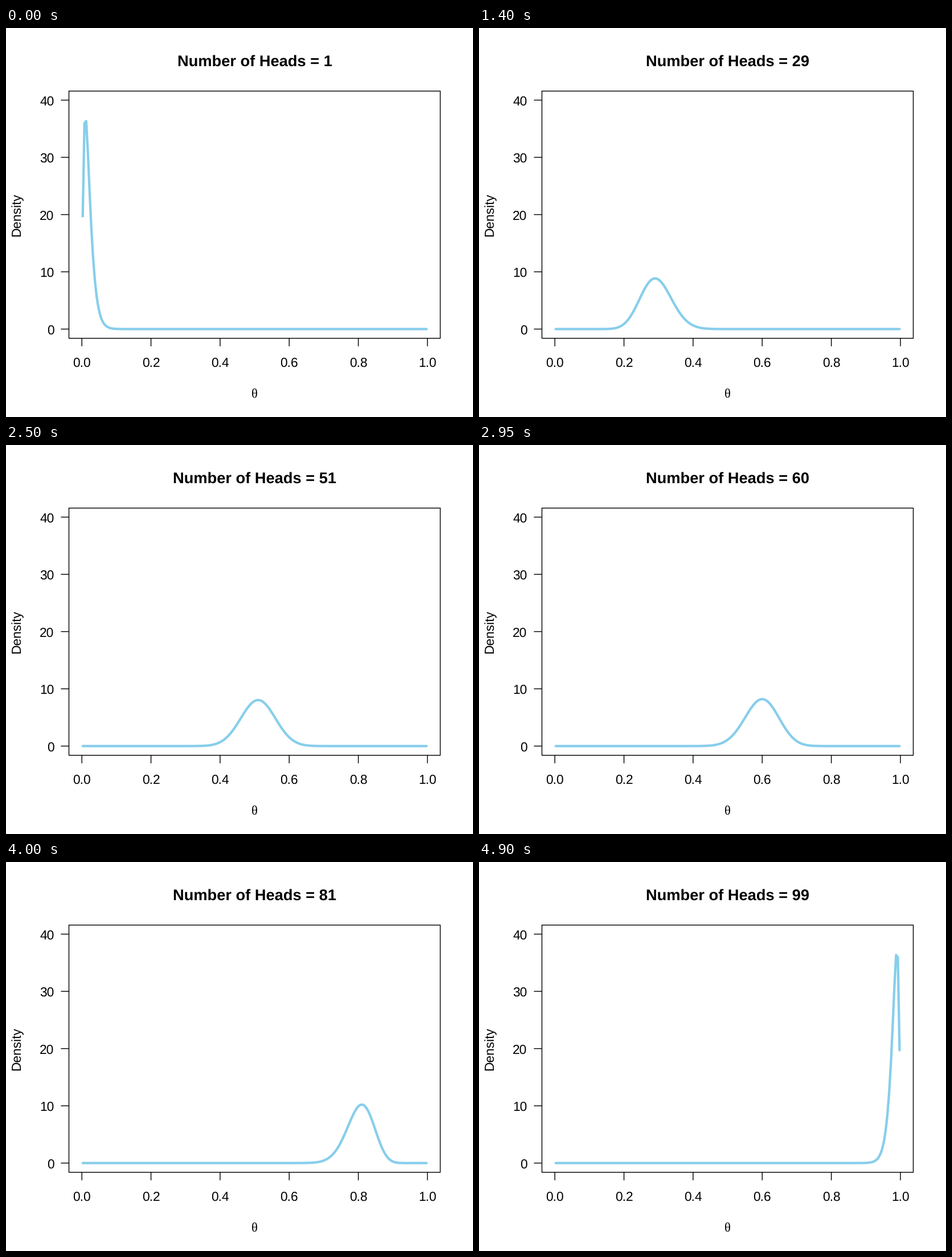
These frames come from a looping animation (820 by 683 pixels, 4.95 s). A matplotlib script:

```python
import numpy as np
import matplotlib.pyplot as plt
from math import lgamma
from matplotlib.animation import FuncAnimation

W, H, DPI = 820, 683, 64
PT = 72 / DPI              # points per pixel
TOSSES = 100
EM = 22.7                  # base text size in pixels
LINE = 1.42                # base stroke in pixels
LEFT, RIGHT, TOP, BOTTOM = 110.5, 762.5, 110.7, 544.8
TICK = 13.6

plt.rcParams.update({
    "font.family": "Liberation Sans",
    "text.hinting": "none",
    "path.simplify": False,
})

fig = plt.figure(figsize=(W / DPI, H / DPI), dpi=DPI, facecolor="white")
ax = fig.add_axes([0, 0, 1, 1])
ax.set_xlim(0, W)
ax.set_ylim(H, 0)
ax.axis("off")


def px(theta):
    return 133.2 + 606.8 * theta


def py(density):
    return 528.6 - 10.05 * density


def stroke(xs, ys, width=LINE, color="black", **kw):
    return ax.plot(xs, ys, color=color, lw=width * PT, snap=False,
                   solid_capstyle="round", solid_joinstyle="round", **kw)[0]


def label(x, y, text, size=EM, ha="center", **kw):
    return ax.text(x, y, text, fontsize=size * PT, ha=ha,
                   va=kw.pop("va", "baseline"), color="black", **kw)


def posterior(heads):
    """Beta density after a flat prior, evaluated at the grid midpoints."""
    a, b = heads + 1, TOSSES - heads + 1
    log_norm = lgamma(a + b) - lgamma(a) - lgamma(b)
    return np.exp(log_norm + heads * np.log(grid)
                  + (TOSSES - heads) * np.log(1 - grid))


grid = (np.arange(200) + 0.5) / 200
curve = stroke(px(grid), py(0 * grid), 3 * LINE, "#87CEEB", zorder=2)

# Frame and axes
stroke([LEFT, RIGHT, RIGHT, LEFT, LEFT], [TOP, TOP, BOTTOM, BOTTOM, TOP], zorder=3)
for t in np.arange(6) / 5:
    stroke([px(t)] * 2, [BOTTOM, BOTTOM + TICK])
    label(px(t), 594.5, f"{t:.1f}")
for d in range(0, 41, 10):
    stroke([LEFT - TICK, LEFT], [py(d)] * 2)
    label(84.5, py(d) + 8.7, str(d), ha="right")

label(436.7, 649, "θ", family="Liberation Serif")
label(25, 328, "Density", rotation=90, ha="right", va="center_baseline").set(
    rotation_mode="anchor", ha="center", va="baseline")
title = label(436.6, 66.5, "", 1.2 * EM, weight="bold")


def update(i):
    heads = i + 1
    title.set_text(f"Number of Heads = {heads}")
    curve.set_ydata(py(posterior(heads)))
    return curve, title


anim = FuncAnimation(fig, update, frames=TOSSES - 1, interval=50,
                     repeat=True, repeat_delay=0)
plt.show()
```
